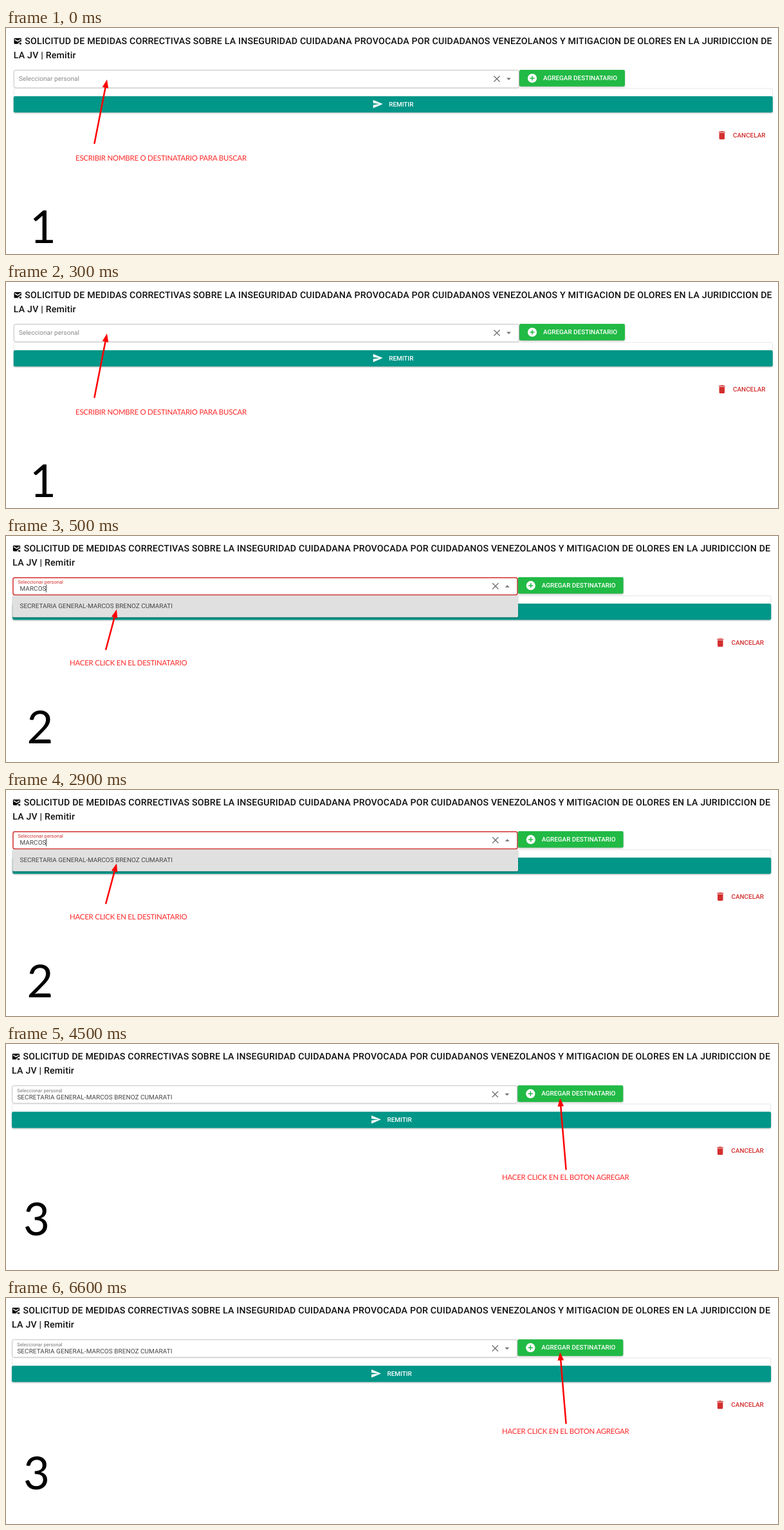
Recreate the animation shown at these times as an HTML page. Size 1200 px wide and 351 px high, loop 8 s.

```html
<!DOCTYPE html>
<html lang="es">
<head>
<meta charset="utf-8">
<style>
html, body { margin: 0; width: 100%; height: 100%; overflow: hidden; background: #fff; }
svg { display: block; width: 1200px; height: 351px; font: 9.94px Roboto, sans-serif; text-rendering: geometricPrecision; }
.title { font-size: 14.2px; font-weight: 500; letter-spacing: .0125em; fill: #111; }
.btn { font-weight: 500; }
.field { letter-spacing: .00937em; }
.small { font-size: 7.45px; }
.value { fill: #444; }
.raised { filter: drop-shadow(0 1px 1px rgba(0, 0, 0, .28)); }
.note { font: 11.4px Lato, sans-serif; letter-spacing: -.2px; fill: #ff2626; }
.step { font: 70.5px Lato, sans-serif; text-anchor: middle; }
</style>
</head>
<body>
<svg id="stage" viewBox="0 0 1200 351"></svg>
<script>
const RED = '#d32f2f', GREEN = '#21ba45', TEAL = '#009688', GREY = '#757575';
const PERSON = 'MARCOS BRENOZ CUMARATI';
const ENTRY = 'SECRETARIA GENERAL-' + PERSON;

const text = (x, y, str, cls, fill = '') =>
  `<text x="${x}" y="${y}" class="${cls}" ${fill && `fill="${fill}"`}>${str}</text>`;
const rect = (x, y, w, h, r, attrs) =>
  `<rect x="${x}" y="${y}" width="${w}" height="${h}" rx="${r}" ${attrs}/>`;
const icon = (x, y, scale, fill, d) =>
  `<path transform="translate(${x} ${y}) scale(${scale})" fill="${fill}" d="${d}"/>`;

// Border drawn inside the given box
const frame = (x, y, w, h, r, line, color) =>
  rect(x + line / 2, y + line / 2, w - line, h - line, r,
    `fill="#fff" stroke="${color}" stroke-width="${line}"`);

// Red pointer with a solid head at (x2, y2)
function arrow(x1, y1, x2, y2) {
  const len = Math.hypot(x2 - x1, y2 - y1);
  const angle = Math.atan2(y2 - y1, x2 - x1) * 180 / Math.PI;
  return `<g transform="translate(${x1} ${y1}) rotate(${angle})">
    <path d="M0 0H${len - 10}" stroke="#f00" stroke-width="2.5" stroke-linecap="round"/>
    <path d="M${len} 0l-13 -4.8v9.6z" fill="#f00"/></g>`;
}

// The form shared by all steps
function form(open) {
  return icon(11.4, 13.6, .56, '#000',
      'M20 4H4c-1.1 0-2 .9-2 2v12c0 1.1.9 2 2 2h9v-3h4v-4h5V6c0-1.1-.9-2-2-2zm0 5l-8 5-8-5V6l8 5 8-5zM19 15l4 4-4 4v-3h-4v-2h4z') +
    text(29.3, 24.7, 'SOLICITUD DE MEDIDAS CORRECTIVAS SOBRE LA INSEGURIDAD CUIDADANA PROVOCADA POR CUIDADANOS VENEZOLANOS Y MITIGACION DE OLORES EN LA JURIDICCION DE', 'title') +
    text(11.8, 47.2, 'LA JV | Remitir', 'title') +
    frame(11.8, 93.5, 1180, 14, 2, .8, '#e0e0e0') +
    frame(11.8, 65.1, 786.2, 28.3, 2.8, open ? 1.5 : .9, open ? RED : '#b9b9b9') +
    `<path d="M758.4 74.4l9.2 9.2m0 -9.2l-9.2 9.2" stroke="${GREY}" stroke-width="1.4"/>` +
    `<path d="${open ? 'M778 80.9h7l-3.5 -3.5z' : 'M778 77.6h7l-3.5 3.5z'}" fill="${GREY}"/>` +
    rect(798, 65.1, 164, 25.6, 2.1, `fill="${GREEN}" class="raised"`) +
    '<circle cx="818" cy="78" r="7.1" fill="#fff"/>' +
    `<path d="M814.4 78h7.2m-3.6 -3.6v7.2" stroke="${GREEN}" stroke-width="1.5"/>` +
    text(835, 81.3, 'AGREGAR DESTINATARIO', 'btn', '#fff') +
    rect(11.8, 106, 1180, 25.3, 2.1, `fill="${TEAL}" class="raised"`) +
    icon(569.3, 109.6, .71, '#fff', 'M2 21L23 12 2 3V10l15 2-15 2z') +
    text(595.2, 121.8, 'REMITIR', 'btn', '#fff') +
    icon(1104.3, 158.1, .71, RED,
      'M6 19c0 1.1.9 2 2 2h8c1.1 0 2-.9 2-2V7H6zM19 4h-3.5l-1-1h-5l-1 1H5v2h14z') +
    text(1130, 170, 'CANCELAR', 'btn', RED);
}

const label = (x, y, fill, cls = '') => text(x, y, 'Seleccionar personal', 'field ' + cls, fill);

const scenes = [
  { end: 500, place: '', body:
    label(20, 82.4, '#888') +
    arrow(137.5, 179, 157, 80) +
    text(108, 206.2, 'ESCRIBIR NOMBRE O DESTINATARIO PARA BUSCAR', 'note') +
    text(57.5, 334, '1', 'step') },
  { end: 4500, open: true, place: 'translate(-1.6 -1.1) scale(.9992 1)', body:
    label(18.4, 74.2, RED, 'small') +
    text(21.5, 85.3, PERSON.split(' ')[0], 'field value') +
    rect(62.2, 75.5, .8, 12, 0, 'fill="#222"') +
    rect(10.2, 92.6, 785.8, 33.6, 2, 'fill="#e0e0e0" class="raised"') +
    text(21.6, 112.2, ENTRY, 'value') +
    arrow(155.3, 176, 172, 114) +
    text(99, 200.6, 'HACER CLICK EN EL DESTINATARIO', 'note') +
    text(53, 321.5, '2', 'step') },
  { end: 8000, place: 'translate(-2.7 -.8)', body:
    label(17.2, 74.5, '#777', 'small') +
    text(17.4, 86.2, ENTRY, 'field value') +
    arrow(870.5, 194.5, 861.2, 84) +
    text(771, 210.6, 'HACER CLICK EN EL BOTON AGREGAR', 'note') +
    text(47.5, 296.5, '3', 'step') }
];

const stage = document.getElementById('stage');
stage.innerHTML = scenes.map(s =>
  `<g><g transform="${s.place}">${form(s.open)}</g>${s.body}</g>`).join('');
const groups = [...stage.children];

const start = performance.now();
function draw() {
  const t = (performance.now() - start) % 8000;
  const current = scenes.findIndex(s => t < s.end);
  groups.forEach((g, i) => g.style.display = i === current ? '' : 'none');
  requestAnimationFrame(draw);
}
draw();
</script>
</body>
</html>
```
